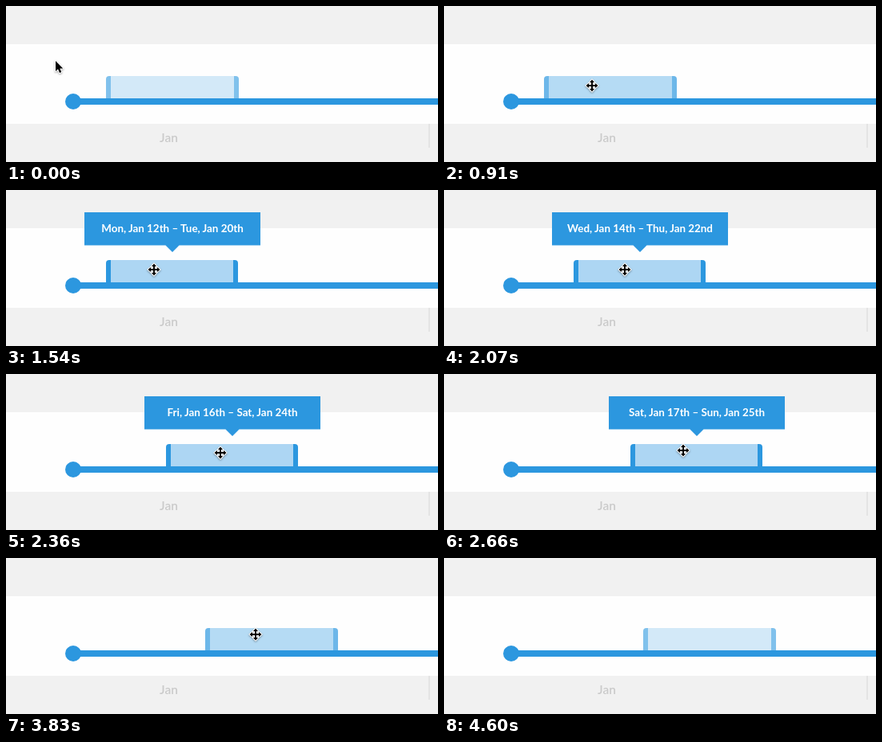
Recreate the animation shown at these times as an HTML page. Size 540 by 196 pixels, loop 5.08 s.

```html
<!DOCTYPE html>
<html lang="en">
<meta charset="utf-8">
<title>Date range slider</title>
<style>
  html, body { margin: 0; width: 100%; height: 100%; overflow: hidden; background: #f1f1f1; }
  svg { display: block; }
  text { font-family: Lato, "Open Sans", sans-serif; text-anchor: middle; }
  .blue { fill: #2c97df; }
  .cursor { stroke: #fff; stroke-width: 2; paint-order: stroke; stroke-linejoin: round;
    filter: drop-shadow(0 1px 1px rgba(0, 0, 0, .35)); }
</style>
<svg width="540" height="196" viewBox="0 0 540 196">
  <rect width="540" height="196" fill="#f1f1f1"/>
  <rect y="48" width="540" height="100" fill="#fefefe"/>
  <rect x="528" y="148" width="2" height="30" fill="#e4e4e4"/>
  <text x="203.5" y="171" font-size="15.5" font-weight="600" fill="#cacaca">Jan</text>
  <g id="range" class="blue">
    <rect id="fill" x="6" y="88" height="28"/>
    <path id="left" d="M6 88V116H0V92Q0 88 4 88Z"/>
    <path id="right" d="M-6 88V116H0V92Q0 88-4 88Z"/>
  </g>
  <g class="blue">
    <rect x="84" y="116" width="456" height="8"/>
    <circle cx="84" cy="120" r="10"/>
  </g>
  <g id="tip">
    <path class="blue" d="M-110 28H110V69.5H8.5L0 78-8.5 69.5H-110Z"/>
    <text id="label" y="53" font-size="13.4" font-weight="700" fill="#fff"></text>
  </g>
  <path id="arrow" class="cursor" d="M0 0V13L3 10.2 5 15 7.3 14 5.3 9.4H9.3Z"/>
  <path id="move" class="cursor" d="M0-7.5 3-4H1V-1H4V-3L7.5 0 4 3V1H1V4H3L0 7.5-3 4H-1V1H-4V3L-7.5 0-4-3V-1H-1V-4H-3Z"/>
</svg>
<script>
const $ = id => document.getElementById(id);
const LOOP = 5080, START = 125, DAY = 20.7;
const DAYS = ["Sun", "Mon", "Tue", "Wed", "Thu", "Fri", "Sat"];

// Progress from 0 to 1 between two times
const ramp = (t, from, to) => Math.min(1, Math.max(0, (t - from) / (to - from)));
const easeOut = (u, power) => 1 - (1 - u) ** power;
const smooth = u => u * u * (3 - 2 * u);

function date(n) {
  const suffix = { 21: "st", 22: "nd", 23: "rd" }[n] || "th";
  return `${DAYS[(n - 11) % 7]}, Jan ${n}${suffix}`;
}

function place(id, x, y = 0) {
  $(id).setAttribute("transform", `translate(${Math.round(x)} ${Math.round(y)})`);
}

function draw(t) {
  const hover = ramp(t, 570, 910) - ramp(t, 4150, 4600);
  const active = ramp(t, 1143, 1540) - ramp(t, 3550, 3830);

  // The range trails the pointer, then snaps to a whole day
  const shift = 127 * easeOut(ramp(t, 1822, 2940), 1.37) - 3 * ramp(t, 3600, 3720);
  const x = START + shift, width = active > 0 ? 165 : 166;
  place("range", x);
  place("right", width);
  $("fill").setAttribute("width", width - 12);
  $("fill").style.opacity = .2 + .15 * hover + .04 * active;
  $("left").style.opacity = $("right").style.opacity = .6 + .09 * hover + .31 * active;

  const first = 12 + Math.round(shift / DAY);
  place("tip", x + 83);
  $("tip").style.opacity = active;
  $("label").textContent = `${date(first)} – ${date(first + 8)}`;

  // Pointer: approach, drag, leave
  const enter = smooth(ramp(t, 320, 900));
  const drag = easeOut(ramp(t, 1840, 2940), 1.65);
  const leave = ramp(t, 4150, 4420) ** 2;
  const mx = 62 + 123 * enter + 127 * drag + 228 * leave;
  const my = 69 + 31 * enter - 4 * ramp(t, 2300, 2660) + 134 * leave;
  const over = mx >= x && mx <= x + width && my >= 88 && my < 116;
  place("arrow", mx, my);
  place("move", mx, my);
  $("arrow").style.display = over ? "none" : "";
  $("move").style.display = over ? "" : "none";
}

const begin = performance.now();
function tick() {
  draw((performance.now() - begin) % LOOP);
  requestAnimationFrame(tick);
}
tick();
</script>
</html>
```
